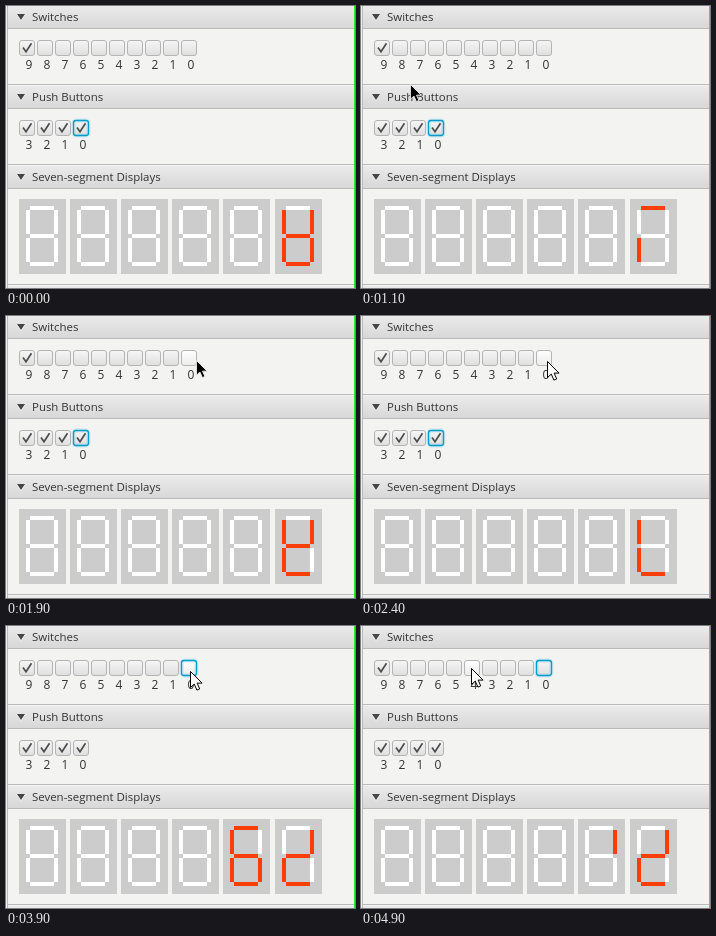
Write an HTML page that moves like this. It is 349 px wide and 282 px high and loops after 5 s.

```html
<!DOCTYPE html>
<html lang="en">
<head>
<meta charset="utf-8">
<title>Board panel</title>
<style>
  html, body { margin: 0; width: 100%; height: 100%; overflow: hidden; background: #f3f3f2; }
  svg { display: block; width: 349px; height: 282px; }
  text { font: 11.45px "Open Sans", "Noto Sans", sans-serif; fill: #333; }
  .num { font-size: 12px; text-anchor: middle; }
  .box { fill: url(#boxFill); stroke: #b4b4b4; }
  .hover .box { fill: url(#hoverFill); }
  .ring { fill: none; stroke: #039ed3; stroke-width: 4; opacity: .15; visibility: hidden; }
  .focus .ring { visibility: visible; }
  .focus .box { stroke: #039ed3; stroke-width: 1.3; }
  .tick { fill: none; stroke: #4c4c4c; stroke-width: 1.7; visibility: hidden; }
  .checked .tick { visibility: visible; }
  .seg { fill: #fff; }
  .seg.on { fill: #fa3e0a; }
</style>
</head>
<body>
<svg id="stage" viewBox="0 0 349 282">
  <defs>
    <linearGradient id="headFill" x2="0" y2="1">
      <stop stop-color="#ebebeb"/><stop offset="1" stop-color="#d7d7d7"/>
    </linearGradient>
    <linearGradient id="headHover" x2="0" y2="1">
      <stop stop-color="#f4f4f4"/><stop offset="1" stop-color="#e2e2e2"/>
    </linearGradient>
    <linearGradient id="boxFill" x2="0" y2="1">
      <stop stop-color="#f6f6f6"/><stop offset="1" stop-color="#dfdfdf"/>
    </linearGradient>
    <linearGradient id="hoverFill" x2="0" y2="1">
      <stop stop-color="#fff"/><stop offset="1" stop-color="#ececec"/>
    </linearGradient>
  </defs>
</svg>
<script>
const LOOP = 5000, STEP = 100;
const stage = document.getElementById('stage');

function add(tag, attrs, parent = stage, text) {
  const el = document.createElementNS('http://www.w3.org/2000/svg', tag);
  for (const k in attrs) el.setAttribute(k, attrs[k]);
  if (text !== undefined) el.textContent = text;
  parent.appendChild(el);
  return el;
}

function rect(x, y, width, height, fill, parent) {
  return add('rect', { x, y, width, height, fill }, parent);
}

function header(y, title) {
  const bar = rect(2, y, 346, 24, 'url(#headFill)');
  rect(2, y, 346, 1, '#f3f3f3');
  rect(2, y - 1, 346, 1, '#bababa');
  rect(2, y + 23, 346, 1, '#bababa');
  if (title) {
    add('path', { d: `M11 ${y + 10}h8l-4 6z`, fill: '#fff' });
    add('path', { d: `M11 ${y + 9}h8l-4 6z`, fill: '#454545' });
    add('text', { x: 26, y: y + 16 }, stage, title);
  }
  return bar;
}

function checkRow(y, count) {
  return Array.from({ length: count }, (_, i) => {
    const x = 13 + 18 * i;
    const el = add('g', {});
    add('rect', { class: 'box', x: x + .5, y: y + .5, width: 15, height: 15, rx: 2.5 }, el);
    add('rect', { class: 'ring', x: x + .6, y: y + .6, width: 14.8, height: 14.8, rx: 2.5 }, el);
    add('path', { class: 'tick', d: `M${x + 4} ${y + 7.5}l3 4.2l5.5-8.5` }, el);
    add('text', { class: 'num', x: x + 10, y: y + 29 }, stage, count - 1 - i);
    return { el, x, y };
  });
}

// Segments a..g as x, y, width, height inside a panel
const SEGS = [
  [11, 7, 24, 4], [35, 11, 4, 24], [35, 39, 4, 24], [11, 63, 24, 4],
  [7, 39, 4, 24], [7, 11, 4, 24], [11, 35, 24, 4]
];

function digit(x, y) {
  rect(x, y, 47, 75, '#ccc');
  return SEGS.map(([sx, sy, width, height]) =>
    add('rect', { class: 'seg', x: x + sx, y: y + sy, width, height }));
}

rect(0, 0, 349, 282, '#f3f3f2');
header(-1, 'Switches');
const keyHead = header(79, 'Push Buttons');
header(159, 'Seven-segment Displays');
header(279);
rect(0, 0, 1, 282, '#f0f0f0');
rect(1, 0, 1, 282, '#b9b9b9');
rect(348, 0, 1, 282, '#2df02d');

const switches = checkRow(34, 10);
const keys = checkRow(114, 4);
const digits = Array.from({ length: 6 }, (_, i) => digit(Math.floor(13 + 51.2 * i), 193));
const cursor = add('path', {
  d: 'M.5 .5V16.5L4.3 13.1L6.9 19.1L9.7 17.9L7.1 12.1H12.1Z', 'stroke-width': 1
});

// Time, value: a free-running 7-bit counter drives the segments
const COUNT = [[0, 126], [1100, 273], [1900, 378], [2400, 440], [3000, 519], [3900, 637], [4900, 770]];
const LATCH = 90;
const PRESS = 2600, ON = 2700, OFF = 3400;

// Time, x, y of the pointer tip
const PATH = [
  [300, 30, 8], [600, 21, 8], [800, 18, 34], [1100, 49, 78], [1300, 84, 84],
  [1600, 158, 58], [1900, 190, 44], [2100, 186, 45], [3000, 186, 45],
  [3900, 184, 45], [4200, 145, 43], [4500, 120, 42], [4700, 110, 42]
];

function sample(table, t) {
  const n = table.findIndex(row => row[0] > t);
  if (n < 0) return table[table.length - 1].slice(1);
  if (n === 0) return table[0].slice(1);
  const a = table[n - 1], b = table[n];
  const k = (t - a[0]) / (b[0] - a[0]);
  return a.slice(1).map((v, i) => Math.round(v + (b[i + 1] - v) * k));
}

function show(segs, bits) {
  segs.forEach((s, i) => s.classList.toggle('on', !!(bits >> i & 1)));
}

function mark(box, name, on) {
  box.el.classList.toggle(name, on);
}

function draw(t) {
  const bits = sample(COUNT, t)[0] % 128;
  const held = t >= ON;
  show(digits[5], held ? LATCH : bits);
  show(digits[4], held ? bits : 0);

  const [x, y] = sample(PATH, t);
  const visible = t >= PATH[0][0];
  const dark = t < 2000;
  cursor.setAttribute('transform', `translate(${x} ${y})${dark ? ' scale(.92)' : ''}`);
  cursor.setAttribute('fill', dark ? '#000' : '#fff');
  cursor.setAttribute('stroke', dark ? '#e8e8e8' : '#000');
  cursor.setAttribute('visibility', visible ? 'visible' : 'hidden');

  const focus = t < PRESS ? keys[3] : switches[9];
  [...switches, ...keys].forEach(b => {
    mark(b, 'focus', b === focus);
    mark(b, 'hover', visible && x >= b.x && x < b.x + 16 && y >= b.y && y < b.y + 16);
    mark(b, 'checked', b === switches[0] || keys.includes(b) ||
      (b === switches[9] && t >= ON && t < OFF));
  });
  keyHead.setAttribute('fill', visible && y >= 79 && y < 103 ? 'url(#headHover)' : 'url(#headFill)');
}

const start = performance.now();
function tick() {
  const t = (performance.now() - start) % LOOP;
  draw(Math.floor(t / STEP) * STEP);
  requestAnimationFrame(tick);
}
tick();
</script>
</body>
</html>
```
